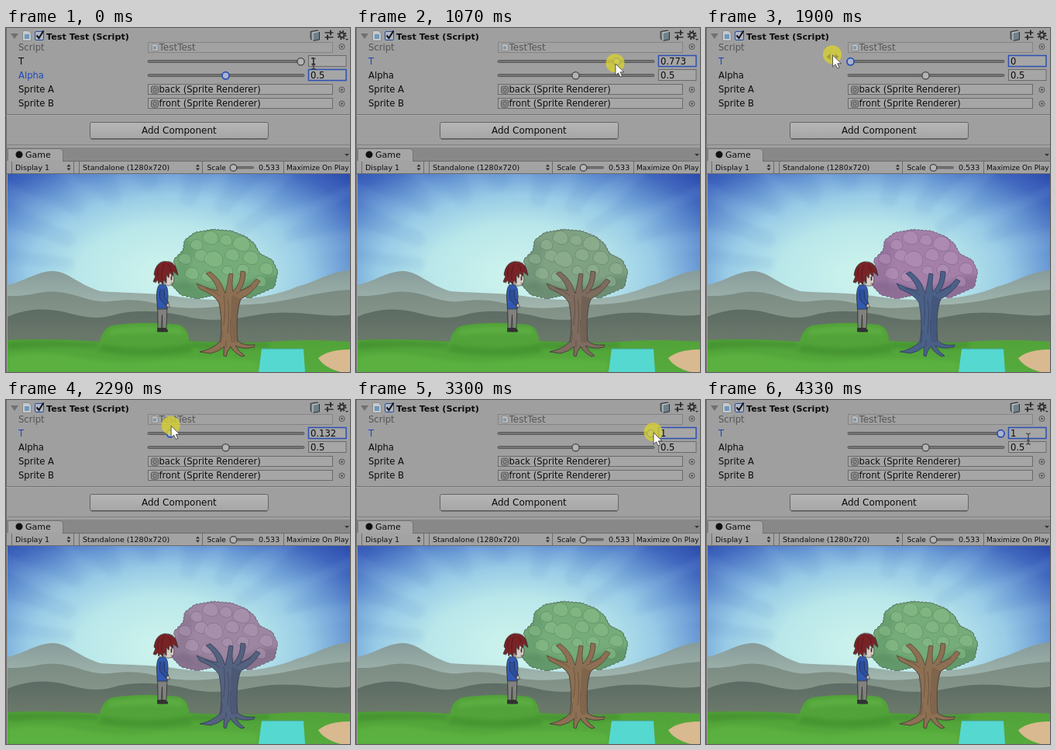
Animation, 444 px wide and 443 px high, one loop 4400 ms. Source, as an HTML page:

```html
<!DOCTYPE html>
<html lang="en">
<head>
<meta charset="utf-8">
<title>Inspector slider and tree</title>
<style>
  html, body { margin: 0; width: 100%; height: 100%; overflow: hidden; background: #9f9f9f; }
  svg { display: block; width: 444px; height: 443px; }
  text { font-family: "DejaVu Sans", Verdana, sans-serif; font-size: 11.6px; fill: #0c0c0c; white-space: pre; }
  .small text { font-size: 9.5px; }
  .focus { fill: #1d48b8; }
  .field { fill: #a6a6a6; stroke: #6a6a6a; }
  .field.on { stroke: #2b50b4; stroke-width: 1.5; }
  .knob { fill: #b4b4b4; stroke: #444; stroke-width: 1.3; }
  .knob.on { fill: #a9b5cf; stroke: #2b50b4; stroke-width: 1.8; }
  .line { fill: none; stroke: #6c6c6c; }
  .ink { fill: none; stroke: #2f2f2f; stroke-width: 1; stroke-linecap: round; stroke-linejoin: round; }
  .spring { --leaf: #75ac79; --lit: #8bc08c; --shade: #558a60; --bark: #8d7053; --dark: #574434; --edge: #416647; }
  .dream { --leaf: #a480a9; --lit: #b793bc; --shade: #7f6088; --bark: #4b6086; --dark: #2e3b5d; --edge: #5e4767; }
  #hero .top { animation: breathe 2.2s ease-in-out infinite alternate; }
  @keyframes breathe { to { transform: translateY(.6px); } }
</style>
</head>
<body>
<svg viewBox="0 0 444 443">
  <defs>
    <radialGradient id="sky" gradientUnits="userSpaceOnUse" cx="0" cy="0" r="1" gradientTransform="translate(208 320) scale(330 190)">
      <stop offset="0" stop-color="#cff4ed"/><stop offset=".35" stop-color="#b9e7ea"/>
      <stop offset=".55" stop-color="#98cbe6"/><stop offset=".7" stop-color="#6d9dd6"/>
      <stop offset=".86" stop-color="#4067be"/><stop offset="1" stop-color="#2b4aad"/>
    </radialGradient>
    <linearGradient id="far" x2="0" y2="1"><stop stop-color="#879b99"/><stop offset=".5" stop-color="#a2b7af"/></linearGradient>
    <linearGradient id="mid" x2="0" y2="1"><stop stop-color="#7a8b83"/><stop offset="1" stop-color="#919f8f"/></linearGradient>
    <linearGradient id="near" x2="0" y2="1"><stop stop-color="#5c6b64"/><stop offset="1" stop-color="#727f6f"/></linearGradient>
    <linearGradient id="grass" x2="0" y2="1"><stop stop-color="#50a038"/><stop offset="1" stop-color="#55aa3c"/></linearGradient>
    <linearGradient id="button" x2="0" y2="1"><stop stop-color="#b6b6b6"/><stop offset="1" stop-color="#a6a6a6"/></linearGradient>
    <filter id="soft" x="-20%" y="-20%" width="140%" height="140%"><feGaussianBlur stdDeviation="2.5"/></filter>
    <clipPath id="view"><rect x="2" y="188" width="442" height="255"/></clipPath>
    <clipPath id="crown"><path class="crown"/></clipPath>

    <g id="tree">
      <path class="crown" fill="var(--leaf)" stroke="var(--edge)" stroke-width=".8" stroke-opacity=".75"/>
      <g clip-path="url(#crown)">
        <path d="M208 332Q235 322 258 331T308 328T354 320V356H208Z" fill="var(--shade)" opacity=".55" filter="url(#soft)"/>
        <path d="M208 330Q228 300 222 285L232 270L244 287Q232 306 238 340Z" fill="var(--shade)" opacity=".35" filter="url(#soft)"/>
        <g id="puffs" fill="var(--lit)" stroke="var(--edge)" stroke-width=".7" stroke-opacity=".45" fill-opacity=".5"/>
      </g>
      <path d="M276 404C280 384 277 364 275 354Q270 344 250 336L246 329Q264 337 273 338Q271 327 258 316L264 314Q278 325 281 337L283 342Q286 329 288 316L293 317Q291 331 293 340Q303 329 303 313L309 314Q309 328 302 338Q315 334 323 323L328 326Q319 341 303 349C298 360 297 383 299 403Q307 410 321 408L320 411Q305 414 296 409Q300 417 308 422L304 423Q294 418 290 410Q285 416 284 423L281 422Q281 414 282 410Q274 417 264 419L250 417Q266 414 276 404Z" fill="var(--bark)" stroke="var(--dark)" stroke-width=".8" stroke-linejoin="round"/>
      <path d="M292 344Q288 368 293 405L299 404Q294 375 303 349Z" fill="var(--dark)" opacity=".25"/>
      <path d="M281 344Q284 360 281 383M286 350Q289 364 286 393M279 390Q280 400 277 406M290 375Q289 395 292 405M276 345Q270 339 257 335M297 342Q309 336 317 332M284 402V410" fill="none" stroke="var(--dark)" stroke-width=".7" stroke-opacity=".8"/>
    </g>
  </defs>

  <rect width="444" height="443" fill="#9f9f9f"/>
  <path d="M.5 0V443" stroke="#6b6b6b"/>

  <!-- component header -->
  <path d="M6 7H16L11 14Z" fill="#707070"/>
  <path d="M21.5 3.5H29L32.5 7V16.5H21.5Z" fill="#c6cacd" stroke="#8a8a8a"/>
  <rect x="24" y="8" width="6" height="6" fill="#6c98c0"/>
  <rect x="37.5" y="4.5" width="11" height="11" rx="1.500" fill="#aeb7ca" stroke="#2c4d9c"/>
  <path d="M39.5 9.500L42.500 13L48.500 3.500" fill="none" stroke="#111" stroke-width="2"/>
  <text x="52" y="14.500" style="font-weight:700;font-size:11.200px">Test Test (Script)</text>
  <g class="ink">
    <path d="M393.500 4.500L402 3L404.500 5V15L396 16.500L393.500 14Z" fill="#6f8088"/>
    <path d="M396 6V16.500M396 6L404 4.500" stroke="#d4d4d4"/>
    <path d="M412 6H422M412 12H422" stroke-width="1.500"/>
    <path d="M419 3.500V8.500M415 9.500V14.500" stroke-width="2"/>
    <circle cx="433.500" cy="9" r="3" stroke-width="2"/>
    <circle cx="433.500" cy="9" r="5" stroke-width="2" stroke-dasharray="2 1.930" stroke-linecap="butt"/>
    <path d="M438 14H442L440 16Z" fill="#2f2f2f" stroke="none"/>
  </g>

  <!-- property rows -->
  <text x="16" y="28.500" fill-opacity=".5">Script</text>
  <text id="labelT" x="16" y="47">T</text>
  <text id="labelA" x="16" y="65">Alpha</text>
  <text x="16" y="83">Sprite A</text>
  <text x="16" y="101">Sprite B</text>
  <g opacity=".5">
    <rect class="field" x="183.500" y="18.500" width="238" height="13"/>
    <path d="M188.500 20.500H194L196.500 23V29.500H188.500Z" fill="#ddd" stroke="#777"/>
    <rect x="190" y="23.500" width="4" height="4" fill="#5b93c6"/>
    <text x="197.500" y="29" style="font-size:12px">TestTest</text>
  </g>
  <g id="objects"></g>
  <g id="sliders"></g>

  <path d="M0 111.500H444" stroke="#6f6f6f"/><path d="M0 112.500H444" stroke="#acacac"/>
  <rect x="108.500" y="121.500" width="230" height="21" rx="2" fill="url(#button)" stroke="#646464"/>
  <path d="M110 143H337" stroke="#4c4c4c"/>
  <text x="175" y="136" style="font-size:12px">Add Component</text>

  <!-- game tab and toolbar -->
  <path d="M0 150.500H444" stroke="#828282"/>
  <rect x="1" y="154" width="443" height="18" fill="#888"/>
  <path d="M2.500 172V155.500H70Q73 155.500 73.500 159V172Z" fill="#a6a6a6" stroke="#757575"/>
  <circle cx="17" cy="163" r="4.500" fill="#111"/>
  <text x="25" y="167" style="font-size:11px">Game</text>
  <path d="M437 162H443L440 165Z" fill="#333"/>
  <rect x="1" y="171" width="443" height="17" fill="#a3a3a3"/>
  <path class="line" d="M73 171.500H444M1 187.500H444M7.500 172V187M87.500 172V187M94.500 172V187M253.500 172V187M358.500 172V187"/>
  <path d="M78.500 178.500H83.500L81 175.500ZM78.500 180.500H83.500L81 183.500ZM245 178.500H250L247.500 175.500ZM245 180.500H250L247.500 183.500Z" fill="#2c2c2c"/>
  <g class="small">
    <text x="12" y="183">Display 1</text>
    <text x="99" y="183">Standalone (1280x720)</text>
    <text x="259.500" y="183" style="font-size:9px">Scale</text>
    <text x="326" y="183">0.533</text>
    <text x="362" y="183" style="font-size:9.100px">Maximize On Play</text>
  </g>
  <rect x="289.500" y="178.500" width="30" height="2.500" rx="1" fill="#777" stroke="#555" stroke-width=".8"/>
  <circle class="knob" cx="293.500" cy="180" r="4.300"/>

  <!-- scene -->
  <g clip-path="url(#view)">
    <rect x="2" y="188" width="442" height="255" fill="url(#sky)"/>
    <g id="rays" fill="none" stroke-linecap="round" filter="url(#soft)"></g>
    <path d="M2 331C24 326 42 313 60 313C80 313 92 330 122 339C150 341 182 341 207 344C230 347 250 350 270 350C320 350 350 344 376 333C401 327 416 314 444 312V410H2Z" fill="url(#far)"/>
    <path d="M2 345C35 346 44 337 68 340C95 343 108 354 134 352C165 348 180 351 207 358C250 365 280 356 316 356C360 354 401 339 444 337V415H2Z" fill="url(#mid)"/>
    <path d="M2 372C26 361 51 361 72 365C93 370 113 377 138 370C168 361 208 365 239 373C284 381 310 370 343 367C385 364 415 374 444 369V420H2Z" fill="url(#near)"/>
    <path d="M2 402Q55 399 121 404Q125 386 138 383Q178 377 222 382Q236 386 236 403Q300 407 340 404Q390 400 444 404V443H2Z" fill="url(#grass)"/>
    <path d="M124 407Q180 417 238 406L240 418Q180 427 118 417Z" fill="#3d8a2b" opacity=".55" filter="url(#soft)"/>
    <path d="M134 388Q180 380 226 386L230 395Q180 390 131 396Z" fill="#65b548" opacity=".6" filter="url(#soft)"/>
    <path d="M2 404Q50 401 118 406V412Q60 408 2 414ZM238 405Q290 408 340 405V411Q290 416 240 412Z" fill="#3b8429" opacity=".5" filter="url(#soft)"/>
    <path d="M2 424Q40 414 92 424T180 430T260 426T325 430V443H2Z" fill="#62b945" opacity=".5" filter="url(#soft)"/>
    <path d="M330 413H384L386 443H326Z" fill="#55d8d0"/>
    <path d="M330 413H384" stroke="#4a9f78"/>
    <path d="M403 425Q416 414 444 414V443H432Q410 437 403 425Z" fill="#d9b98f"/>

    <use href="#tree" class="dream"/>
    <use href="#tree" class="spring" id="green"/>

    <g id="hero" class="ink" transform="translate(1 -.5)">
      <path d="M195 387H201V391.500H195ZM201 387H204Q208 388 207.500 391.500H200.500Z" fill="#333"/>
      <path d="M195 359H207L206 387H201L200.500 370L199.500 387H195.500Z" fill="#81817f" stroke-width=".8"/>
      <g class="top">
        <path d="M197 331Q193 335 193.500 348L194.500 362H207L208 345Q208 333 204 331Z" fill="#3159b2" stroke-width=".8"/>
        <path d="M198 337Q196 347 199 351Q203 356 207 358L209 354L204 348L203 337" fill="#2b4f9f" stroke-width=".8"/>
        <path d="M207 355Q211 356 210 360L206 359Z" fill="#d8c3b4" stroke-width=".7"/>
        <path d="M202 316H214Q217 321 215.500 328Q213 333 207 332Q201 330 202 316Z" fill="#d9cfc6" stroke-width=".7"/>
        <path d="M212.500 320.500V324.500" stroke-width="1.700"/><path d="M212 329H214.500" stroke-width=".7"/>
        <path d="M192 328L189 327L192 320L190 318Q192 303 203 301Q216 300 219 311L221 319L215 314L214 320L210 315L209 322L206 318L206 329L202 324L202 331L198 327L196 330L195 325Z" fill="#792326" stroke-width=".8"/>
        <path d="M196 309Q194 314 195 321M203 305Q199 312 200 324M208 305Q212 308 212 313" stroke="#4d1419" stroke-width=".7"/>
      </g>
    </g>
  </g>

  <!-- pointer -->
  <g id="pointer">
    <circle id="press" cx="-.5" cy="-.7" r="12" fill="#d9d12f" fill-opacity=".78"/>
    <path id="drag" d="M-8 2L-3 -2V6ZM8 2L3 -2V6Z" fill="#8b8738" opacity=".7"/>
    <path id="arrow" d="M0 0V15L3.500 11.800L6 17L8.500 16L6.200 10.800H11Z" fill="#fff" stroke="#333" stroke-width=".8"/>
    <path id="beam" d="M-3 -6Q0 -6 0 -4Q0 -6 3 -6M0 -4V6M-3 8Q0 8 0 6Q0 8 3 8M-2 3H2" fill="none" stroke="#3a3a3a" stroke-width="1.100"/>
  </g>
</svg>
<script>
  const LOOP = 4400;
  const $ = id => document.getElementById(id);

  // time, pointer x, pointer y, slider value
  const keys = [
    [0, 397, 45, 1], [230, 390, 45, 1], [440, 383, 44, 1], [610, 383, 44, 1],
    [1060, 335, 46, .773], [1090, 335, 46, .773], [1670, 198, 43, .06], [1750, 180, 39, 0], [1890, 163, 35, 0],
    [2060, 171, 34, 0], [2210, 198, 33, .055], [2680, 286, 35.5, .5], [2750, 286, 35.5, .5],
    [3290, 384, 42, 1], [3600, 386, 43, 1], [3850, 400, 46, 1], [4320, 416, 49, 1], [LOOP, 416, 49, 1]
  ];

  function pose(ms) {
    const i = keys.findIndex((k, n) => n && ms <= k[0]);
    const a = keys[i - 1], b = keys[i], p = (ms - a[0]) / (b[0] - a[0]);
    return a.map((v, n) => v + (b[n] - v) * p);
  }

  // shallow bumps along a clockwise outline
  function scallop(points) {
    let d = `M${points[0]}`;
    points.forEach(([x, y], i) => {
      const [u, v] = points[(i + 1) % points.length];
      const len = Math.hypot(u - x, v - y), n = Math.max(1, Math.round(len / 5)), r = len / n * .75;
      for (let k = 0; k < n; k++) d += `a${r} ${r} 0 0 1 ${(u - x) / n} ${(v - y) / n}`;
    });
    return d + 'Z';
  }
  const crown = scallop([
    [213, 329], [220, 309], [217, 299], [229, 287], [231, 274], [244, 264], [267, 260],
    [291, 262], [309, 269], [320, 278], [327, 291], [343, 299], [350, 314], [346, 333],
    [330, 340], [314, 347], [298, 342], [270, 343], [247, 348], [226, 343]
  ]);
  document.querySelectorAll('.crown').forEach(p => p.setAttribute('d', crown));

  $('puffs').innerHTML = [
    [246, 280, 8], [264, 271, 10], [284, 274, 8], [304, 279, 11], [231, 298, 8], [252, 294, 9],
    [292, 293, 9], [316, 297, 10], [268, 299, 12], [240, 317, 9], [336, 311, 9],
    [306, 312, 8], [286, 313, 7], [260, 321, 8], [328, 327, 8]
  ].map(([x, y, r]) =>
    `<path d="M${x - r} ${y + 2}A${r} ${r} 0 1 1 ${x + r * .8} ${y + r * .6}Q${x} ${y + r * 1.1} ${x - r} ${y + 2}Z"/>`).join('');

  let seed = 7;
  const rnd = () => (seed = seed * 16807 % 2147483647) / 2147483647;
  let rays = '';
  for (let i = 0; i < 18; i++) {
    const a = Math.PI * (1.06 + .9 * i / 18), r = 90 + rnd() * 35, s = r + 60 + rnd() * 70;
    const at = q => `${208 + Math.cos(a) * q * 1.45} ${320 + Math.sin(a) * q}`;
    rays += `<path d="M${at(r)}L${at(s)}" stroke="${i % 2 ? '#a5d2f0' : '#3562bd'}" stroke-opacity=".08" stroke-width="${12 + rnd() * 12}"/>`;
  }
  $('rays').innerHTML = rays;

  const picker = y => `<circle cx="433.500" cy="${y}" r="3.500" fill="none" stroke="#555"/><circle cx="433.500" cy="${y}" r="1.200" fill="#444"/>`;
  $('objects').innerHTML = picker(24) + ['back', 'front'].map((name, i) => {
    const y = 72.5 + i * 18;
    return `<rect class="field" x="183.500" y="${y}" width="238" height="13"/>
      <rect x="187.500" y="${y + 2.5}" width="9" height="9" rx="2" fill="#929292" stroke="#555"/>
      <circle cx="192" cy="${y + 7}" r="2.300" fill="none" stroke="#555"/>
      <text x="197.500" y="${y + 10.5}">${name} (Sprite Renderer)</text>${picker(y + 7)}`;
  }).join('');

  $('sliders').innerHTML = ['T', 'A'].map((id, i) => {
    const y = 43 + i * 18;
    return `<rect x="183" y="${y - 1.5}" width="202" height="3" rx="1.500" fill="#747474" stroke="#505050" stroke-width=".8"/>
      <circle class="knob" id="knob${id}" cx="283.500" cy="${y + .3}" r="4.600"/>
      <rect class="field" id="field${id}" x="390.500" y="${y - 7.5}" width="48.500" height="14"/>
      <text id="value${id}" x="393" y="${y + 4}">0.5</text>`;
  }).join('');

  const show = (id, on) => $(id).style.display = on ? '' : 'none';

  function draw(time) {
    const ms = time % LOOP;
    const [, x, y, value] = pose(ms);
    const onT = ms > 520, pressed = onT && ms < 3440, beam = x > 390;

    $('green').setAttribute('opacity', value);
    $('knobT').setAttribute('cx', 186.5 + 194 * value);
    $('valueT').textContent = +value.toFixed(3);
    for (const [id, on] of [['T', onT], ['A', !onT]]) {
      for (const part of ['knob', 'field']) $(part + id).classList.toggle('on', on);
      $('label' + id).classList.toggle('focus', on);
    }
    $('pointer').setAttribute('transform', `translate(${x} ${y})`);
    show('press', pressed);
    show('drag', pressed && x < 183);
    show('arrow', !beam);
    show('beam', beam);
  }

  const start = performance.now();
  function loop() {
    draw(performance.now() - start);
    requestAnimationFrame(loop);
  }
  draw(0);
  requestAnimationFrame(loop);
</script>
</body>
</html>
```
